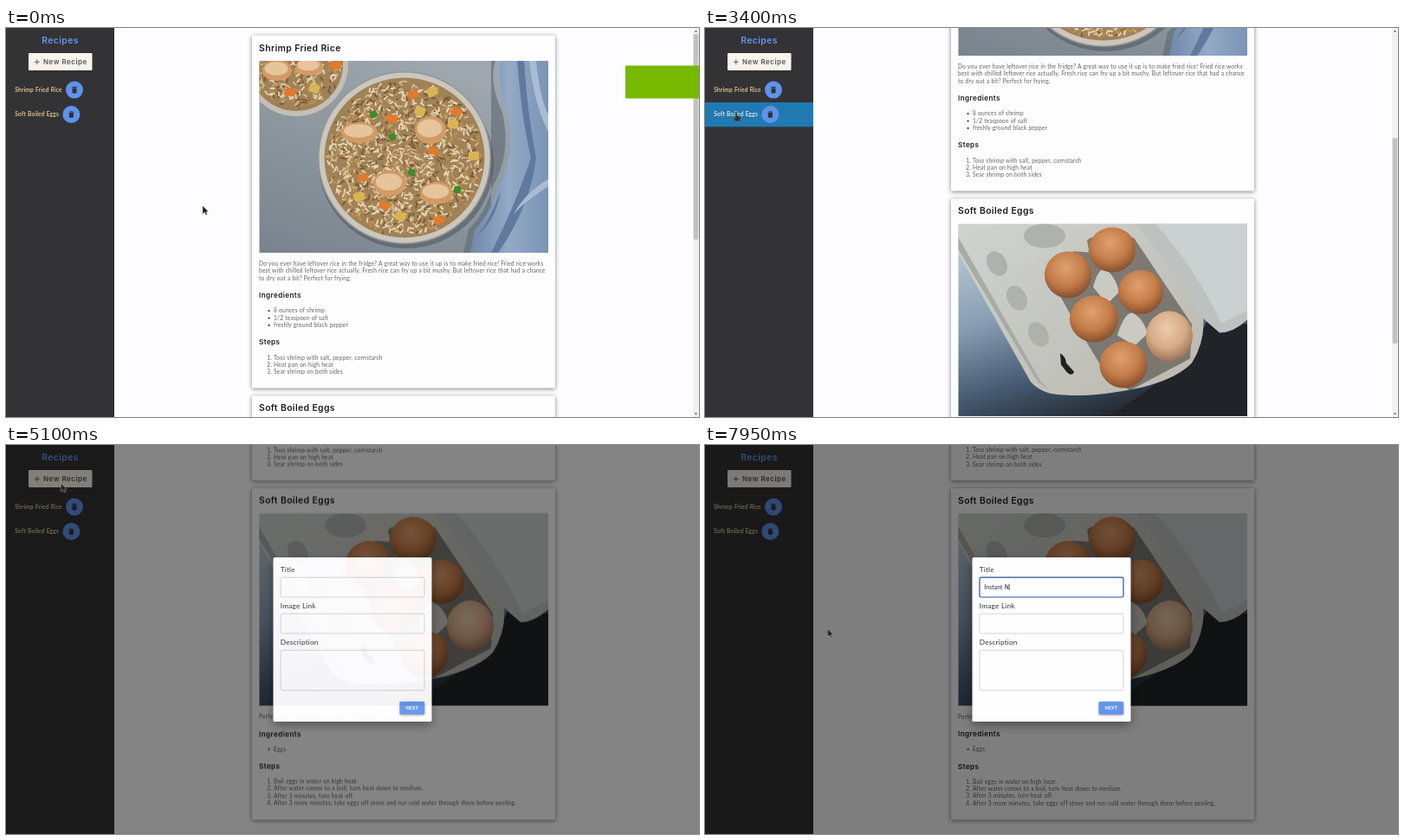
An HTML page for the animation above (8000 ms loop, 800 by 450 pixels).

```html
<!DOCTYPE html>
<html lang="en">
<head>
<meta charset="utf-8">
<title>Recipes</title>
<style>
html, body { margin: 0; width: 100%; height: 100%; overflow: hidden; background: #fdfcfe; }
svg { display: block; width: 800px; height: 450px; }
text { font: 400 6.667px Lato, "Open Sans", sans-serif; letter-spacing: .16px; word-spacing: .2px; fill: #626262; white-space: pre; }
.h1, .h2, .new { font-family: Inter, Roboto, sans-serif; font-weight: 600; word-spacing: 0; fill: #1c1c1e; }
.h1 { font-size: 10.4px; letter-spacing: .38px; }
.h2 { font-size: 8.2px; letter-spacing: .38px; }
.new { font-size: 8px; letter-spacing: .5px; fill: #555; }
.item { font-weight: 600; fill: #f0cf9c; }
.label { font-size: 8.333px; letter-spacing: .14px; fill: #333; }
.next { font-size: 5.4px; font-weight: 700; fill: #fff; text-anchor: middle; }
.num { text-anchor: end; }
.card { fill: #fefdff; filter: drop-shadow(0 1.5px 2.5px rgba(0, 0, 0, .5)); }
.field { fill: #fefdff; stroke: #cbcbcb; stroke-width: .8; }
.lit { fill: #eee; }

.a { animation: 8s linear infinite; }
.step { animation-timing-function: step-end; }
#page { animation-name: scroll; }
#thumb { animation-name: thumb; }
#bar { animation-name: bar; }
#toast { animation-name: toast; }
#row1 { animation-name: row1; }
#row2 { animation-name: row2; }
#modal { animation-name: modal; }
#title { animation-name: title; }
#cursor { animation-name: move; }
#arrow { animation-name: arrow; }
#hand { animation-name: hand; }
#beam { animation-name: beam; }

@keyframes scroll {
  0%, 37.7% { transform: none; animation-timing-function: ease-in-out; }
  46.25%, 100% { transform: translateY(-375.5px); }
}
@keyframes thumb {
  0%, 37.7% { transform: none; animation-timing-function: ease-in-out; }
  46.25%, 100% { transform: translateY(198.5px); }
}
@keyframes bar { 0% { opacity: 1; } 61.25%, 100% { opacity: 0; } }
@keyframes toast {
  0%, .625% { transform: none; animation-timing-function: ease-in; }
  3.75%, 100% { transform: translateX(86px); }
}
@keyframes row1 { 0% { opacity: 0; } 50% { opacity: 1; } 52.5%, 100% { opacity: 0; } }
@keyframes row2 { 0% { opacity: 0; } 29.375% { opacity: 1; } 50%, 100% { opacity: 0; } }
@keyframes modal { 0%, 60.9% { opacity: 0; } 63.9%, 100% { opacity: 1; } }
@keyframes title {
  0% { stroke: #cbcbcb; stroke-width: .8; }
  66.25% { stroke: #3a3a3a; stroke-width: .8; }
  74.375%, 100% { stroke: #2b548f; stroke-width: 1.2; }
}
@keyframes move {
  0% { transform: translate(227px, 205.5px); }
  3.5% { transform: translate(214px, 207px); }
  10.625% { transform: translate(400px, 172px); }
  18.75% { transform: translate(470px, 152px); }
  21.25% { transform: translate(440px, 158px); animation-timing-function: ease-in-out; }
  31.25%, 48.75% { transform: translate(36px, 97.5px); animation-timing-function: ease-in-out; }
  56.875%, 62.5% { transform: translate(49.5px, 38.5px); animation-timing-function: ease-in-out; }
  70.625%, 74.375% { transform: translate(335px, 156px); animation-timing-function: ease-in-out; }
  78.125%, 100% { transform: translate(141.5px, 212.5px); }
}
@keyframes arrow {
  0% { opacity: 1; } 29.375% { opacity: 0; } 62.5% { opacity: 1; }
  69.25% { opacity: 0; } 75.25%, 100% { opacity: 1; }
}
@keyframes hand { 0% { opacity: 0; } 29.375% { opacity: 1; } 62.5%, 100% { opacity: 0; } }
@keyframes beam { 0% { opacity: 0; } 69.25% { opacity: 1; } 75.25%, 100% { opacity: 0; } }
</style>
</head>
<body>
<svg viewBox="0 0 800 450">
  <defs>
    <clipPath id="clip1"><rect x="292.5" y="38" width="333.5" height="222"/></clipPath>
    <clipPath id="clip2"><rect x="292.5" y="79" width="333.5" height="222.5"/></clipPath>
    <linearGradient id="stone" x1=".6" y1="0" x2="0" y2="1">
      <stop stop-color="#9ea7ae"/><stop offset="1" stop-color="#78838d"/>
    </linearGradient>
    <linearGradient id="cloth" x2="1">
      <stop stop-color="#7089aa"/><stop offset=".5" stop-color="#93a9c5"/><stop offset="1" stop-color="#7b94b5"/>
    </linearGradient>
    <linearGradient id="table" x1=".05" y1="0" x2=".5" y2="1">
      <stop stop-color="#c6d2dc"/><stop offset=".45" stop-color="#869cb2"/>
      <stop offset=".75" stop-color="#465a71"/><stop offset="1" stop-color="#222932"/>
    </linearGradient>
    <linearGradient id="carton" x2="1" y2="1">
      <stop stop-color="#cfd3d0"/><stop offset="1" stop-color="#b9b8ae"/>
    </linearGradient>
    <radialGradient id="egg" cx=".45" cy=".35" r=".65">
      <stop stop-color="#e0a172"/><stop offset=".6" stop-color="#c47c48"/><stop offset="1" stop-color="#85502f"/>
    </radialGradient>
    <radialGradient id="pale" cx=".45" cy=".35" r=".65">
      <stop stop-color="#ecccae"/><stop offset=".6" stop-color="#d6aa85"/><stop offset="1" stop-color="#9c745a"/>
    </radialGradient>
    <g id="bin">
      <circle r="10" fill="#5f92ea"/>
      <path transform="scale(.42) translate(-12 -12)" fill="#333"
        d="M6 19c0 1.1.9 2 2 2h8c1.1 0 2-.9 2-2V7H6v12zM19 4h-3.5l-1-1h-5l-1 1H5v2h14V4z"/>
    </g>
  </defs>

  <rect width="800" height="450" fill="#fdfcfe"/>

  <g id="page" class="a">
    <rect class="card" x="284" y="8.5" width="350" height="408" rx="1"/>
    <text class="h1" x="292" y="26.7">Shrimp Fried Rice</text>
    <g clip-path="url(#clip1)">
      <rect x="292" y="38" width="334" height="222" fill="url(#stone)"/>
      <path fill="#5d6872" opacity=".6" d="M565 38Q557 62 573 98Q584 145 562 183Q553 215 534 233L528 260H560V38Z"/>
      <path fill="url(#cloth)" d="M572 38Q564 62 579 96Q590 145 568 183Q560 215 541 233L536 260H626V38Z"/>
      <path fill="#5f7a9e" d="M590 38Q596 110 606 150Q590 200 560 260H568Q606 205 612 150Q602 100 598 38ZM571 188Q560 220 544 240Q566 222 571 188Z"/>
      <path fill="#a9bcd4" d="M604 38Q610 90 626 120V100Q616 80 612 38ZM586 215Q600 190 626 175V183Q600 200 586 215Z"/>
      <circle cx="335" cy="42" r="60" fill="#c3bfb7"/>
      <circle cx="335" cy="42" r="54" fill="#a08257"/>
      <ellipse cx="462" cy="156" rx="101" ry="99" fill="#515b64" opacity=".6"/>
      <circle cx="460" cy="150" r="100" fill="#98968f"/>
      <circle cx="460" cy="150" r="98.5" fill="#cbc7be"/>
      <circle cx="460" cy="150" r="92.5" fill="#a08257"/>
      <g id="food"></g>
    </g>
    <text x="292" y="275">Do you ever have leftover rice in the fridge? A great way to use it up is to make fried rice! Fried rice works</text>
    <text x="292" y="283.3">best with chilled leftover rice actually. Fresh rice can fry up a bit mushy. But leftover rice that had a chance</text>
    <text x="292" y="291.7">to dry out a bit? Perfect for frying.</text>
    <text class="h2" x="292" y="312">Ingredients</text>
    <g class="list" data-y="329.4" data-bullet="1">8 ounces of shrimp|1/2 teaspoon of salt|freshly ground black pepper</g>
    <text class="h2" x="292" y="366">Steps</text>
    <g class="list" data-y="383.5">Toss shrimp with salt, pepper, cornstarch|Heat pan on high heat|Sear shrimp on both sides</g>

    <g transform="translate(0 375.5)">
      <rect class="card" x="284" y="50" width="350" height="383.5" rx="1"/>
      <text class="h1" x="292" y="67.7">Soft Boiled Eggs</text>
      <g clip-path="url(#clip2)">
        <rect x="292" y="79" width="334" height="223" fill="url(#table)"/>
        <path fill="#202327" d="M470 301L560 235L580 190L626 195V302H440Z"/>
        <path fill="url(#carton)" d="M292 79H530L575 185Q578 215 562 240Q545 258 505 268Q450 280 415 277Q390 277 376 262L292 112Z"/>
        <path fill="#bdc2c0" d="M497 79H626V190Q610 205 594 205L572 186Q540 130 497 79Z"/>
        <path fill="#cbd1d0" d="M520 79H626V180L596 194Q566 130 520 79Z"/>
        <path fill="#a9aba5" d="M292 94L388 262L398 272L384 262L292 108Z"/>
        <g fill="#aeb2ad">
          <ellipse cx="337" cy="125" rx="11" ry="15" transform="rotate(-30 337 125)"/>
          <ellipse cx="360" cy="165" rx="11" ry="15" transform="rotate(-30 360 165)"/>
          <ellipse cx="385" cy="207" rx="11" ry="15" transform="rotate(-30 385 207)"/>
          <ellipse cx="392" cy="93" rx="24" ry="14"/>
        </g>
        <path fill="#5f5b53" opacity=".7" d="M445 95L395 135L425 190L455 240L490 272L560 235L562 195L525 140L495 95Z"/>
        <g fill="#cbcac2">
          <path d="M448 152Q454 130 462 131Q474 140 478 158L464 172Z"/>
          <path d="M476 208Q484 182 493 182Q506 188 511 206L496 220Z"/>
          <path d="M415 110Q422 82 432 84Q442 92 443 112Z"/>
        </g>
        <path fill="#1f2022" d="M410 229Q416 232 417 240L426 250Q424 256 418 251L411 242Z"/>
        <g fill="url(#egg)">
          <ellipse cx="470" cy="109" rx="27" ry="26"/>
          <ellipse cx="419" cy="138" rx="27" ry="27"/>
          <ellipse cx="503" cy="158" rx="26" ry="25.5"/>
          <ellipse cx="449" cy="189" rx="28" ry="27"/>
          <ellipse cx="483" cy="242" rx="27.5" ry="27"/>
        </g>
        <ellipse cx="536" cy="209" rx="27" ry="29" fill="url(#pale)"/>
      </g>
      <text x="292" y="316.8">Perfect soft boiled eggs in under 10 minutes.</text>
      <text class="h2" x="292" y="337">Ingredients</text>
      <g class="list" data-y="354.2" data-bullet="1">Eggs</g>
      <text class="h2" x="292" y="374.5">Steps</text>
      <g class="list" data-y="391.6">Boil eggs in water on high heat.|After water comes to a boil, turn heat down to medium.|After 3 minutes, turn heat off.|After 3 more minutes, take eggs off stove and run cold water through them before peeling.</g>
    </g>
  </g>

  <g id="bar" class="a step">
    <rect x="793" width="7" height="450" fill="#f1f1f1"/>
    <path fill="#505050" d="M794.8 4.5L796.5 2.5L798.2 4.5ZM794.8 445.5L796.5 447.5L798.2 445.5Z"/>
    <rect id="thumb" class="a" x="793.7" y="7" width="5.6" height="237.5" fill="#c1c1c1"/>
  </g>

  <rect width="125" height="450" fill="#333335"/>
  <text class="h1" x="41.2" y="18.4" style="fill:#6495ed">Recipes</text>
  <rect x="26" y="29" width="73.5" height="20" rx="1" fill="#f9f3ec"/>
  <path d="M32.8 39.2h6M35.8 36.2v6" stroke="#555" stroke-width=".9"/>
  <text class="new" x="43" y="42.1">New Recipe</text>
  <text class="item" x="10.3" y="73.6">Shrimp Fried Rice</text>
  <text class="item" x="10.3" y="102.1">Soft Boiled Eggs</text>
  <g id="row1" class="a step">
    <rect y="57.5" width="125" height="28.5" fill="#2079b0"/>
    <text class="item lit" x="10.3" y="73.6">Shrimp Fried Rice</text>
  </g>
  <g id="row2" class="a step">
    <rect y="86" width="125" height="28.3" fill="#2079b0"/>
    <text class="item lit" x="10.3" y="102.1">Soft Boiled Eggs</text>
  </g>
  <use href="#bin" x="79" y="71.6"/>
  <use href="#bin" x="75.4" y="100"/>

  <rect id="toast" class="a" x="715" y="43.5" width="86" height="38" fill="#76b900"/>

  <g id="modal" class="a">
    <rect width="800" height="450" opacity=".5"/>
    <rect x="308.5" y="130" width="183" height="190" rx="1.7" fill="#fefdff" style="filter:drop-shadow(0 4px 6px rgba(0,0,0,.4))"/>
    <text class="label" x="316.8" y="146.8">Title</text>
    <rect id="title" class="field a step" x="317" y="153.2" width="166" height="22.8" rx="1.7"/>
    <text class="label" x="316.8" y="188.8">Image Link</text>
    <rect class="field" x="317" y="195.2" width="166" height="22.8" rx="1.7"/>
    <text class="label" x="316.8" y="231">Description</text>
    <rect class="field" x="317" y="237.4" width="166" height="46.4" rx="1.7"/>
    <rect x="454.5" y="296.7" width="28.7" height="15" rx="1.7" fill="#6495ed" style="filter:drop-shadow(0 1px 1px rgba(0,0,0,.35))"/>
    <text class="next" x="468.9" y="306.1">NEXT</text>
    <text id="typed" x="322.3" y="166.5" style="fill:#222"></text>
    <rect id="caret" y="160.5" width=".6" height="7.5" fill="#111"/>
  </g>

  <g id="cursor" class="a">
    <path id="arrow" class="a step" fill="#1d1d1f" stroke="#ddd" stroke-width=".4" d="M0 0V9.5L2.3 7.6L3.8 10.8L5.4 10L3.9 7H6.8Z"/>
    <path id="hand" class="a step" fill="#303033" stroke="#999" stroke-width=".3" d="M-1 .4Q0-.8.9.4V3.8L4.3 4.8Q5.3 5.4 5 7L4.2 10.6H-.8L-3.2 7.2Q-3 5.8-1 7Z"/>
    <path id="beam" class="a step" fill="none" stroke="#111" stroke-width=".8" d="M-1.5-3.7H1.5M0-3.7V3.3M-1.5 3.3H1.5"/>
  </g>
</svg>
<script>
const $ = id => document.getElementById(id);

function add(parent, tag, attrs, text = '') {
  const node = document.createElementNS('http://www.w3.org/2000/svg', tag);
  for (const key in attrs) node.setAttribute(key, attrs[key]);
  node.textContent = text;
  parent.append(node);
  return node;
}

document.querySelectorAll('.list').forEach(list => {
  const lines = list.textContent.split('|');
  const top = +list.dataset.y;
  list.textContent = '';
  lines.forEach((line, i) => {
    const y = top + i * 8.35;
    if (list.dataset.bullet) add(list, 'circle', { cx: 303.6, cy: y - 2.2, r: 1.1, fill: '#333' });
    else add(list, 'text', { class: 'num', x: 307, y }, `${i + 1}.`);
    add(list, 'text', { x: 309, y }, line);
  });
});

let seed = 7;
const rand = () => (seed = seed * 16807 % 2147483647) / 2147483647;

function rice(cx, cy, r, count) {
  ['#7a5a36', '#d6b988', '#bd9052', '#e6d8bb'].forEach(stroke => {
    let d = '';
    for (let i = 0; i < count; i++) {
      const a = rand() * 6.283, s = Math.sqrt(rand()) * r, turn = rand() * 6.283;
      d += `M${cx + s * Math.cos(a)} ${cy + s * Math.sin(a)}l${4 * Math.cos(turn)} ${4 * Math.sin(turn)}`;
    }
    add($('food'), 'path', { d, stroke, 'stroke-width': 1.8, 'stroke-linecap': 'round', fill: 'none' });
  });
}

function pieces(fill, rx, ry, spots) {
  spots.forEach(([x, y], i) => add($('food'), 'rect', {
    x: x - rx, y: y - ry, width: rx * 2, height: ry * 2, rx: ry * .5,
    fill, transform: `rotate(${i * 47 % 60 - 25} ${x} ${y})`
  }));
}

rice(335, 42, 50, 110);
rice(460, 150, 88, 360);
pieces('#d9b455', 6, 5, [[492, 74], [478, 96], [516, 111], [540, 148], [407, 195], [455, 218], [356, 70]]);
pieces('#e27a2c', 6, 4.5, [[470, 77], [520, 97], [493, 142], [412, 173], [500, 222], [437, 205], [446, 105], [328, 74], [381, 43]]);
pieces('#3f8a2b', 4, 4, [[446, 126], [468, 167], [521, 187], [430, 178], [424, 100]]);
const shrimp = [[408, 121, 21, 12], [490, 118, 18, 16], [443, 180, 19, 15], [497, 191, 19, 13], [313, 49, 17, 12], [350, 45, 16, 10]];
for (const [cx, cy, rx, ry] of shrimp) {
  add($('food'), 'ellipse', { cx, cy, rx, ry, fill: '#d29b66' });
  add($('food'), 'ellipse', { cx: cx - 1, cy: cy - 2, rx: rx * .8, ry: ry * .65, fill: '#e6c59d' });
}

// Typing follows the clock of the stylesheet animations.
const word = 'Instant N';
const keys = [6890, 6990, 7140, 7290, 7340, 7490, 7590, 7740, 7930];
const clock = $('cursor').getAnimations()[0];

function tick() {
  const t = (clock.currentTime || 0) % 8000;
  const text = word.slice(0, keys.filter(k => t >= k).length);
  $('typed').textContent = text;
  $('caret').setAttribute('x', 322.3 + (text ? $('typed').getComputedTextLength() : 0));
  $('caret').setAttribute('opacity', t >= 5950 && t < 6450 || t >= keys[0] ? 1 : 0);
  requestAnimationFrame(tick);
}
tick();
</script>
</body>
</html>
```
